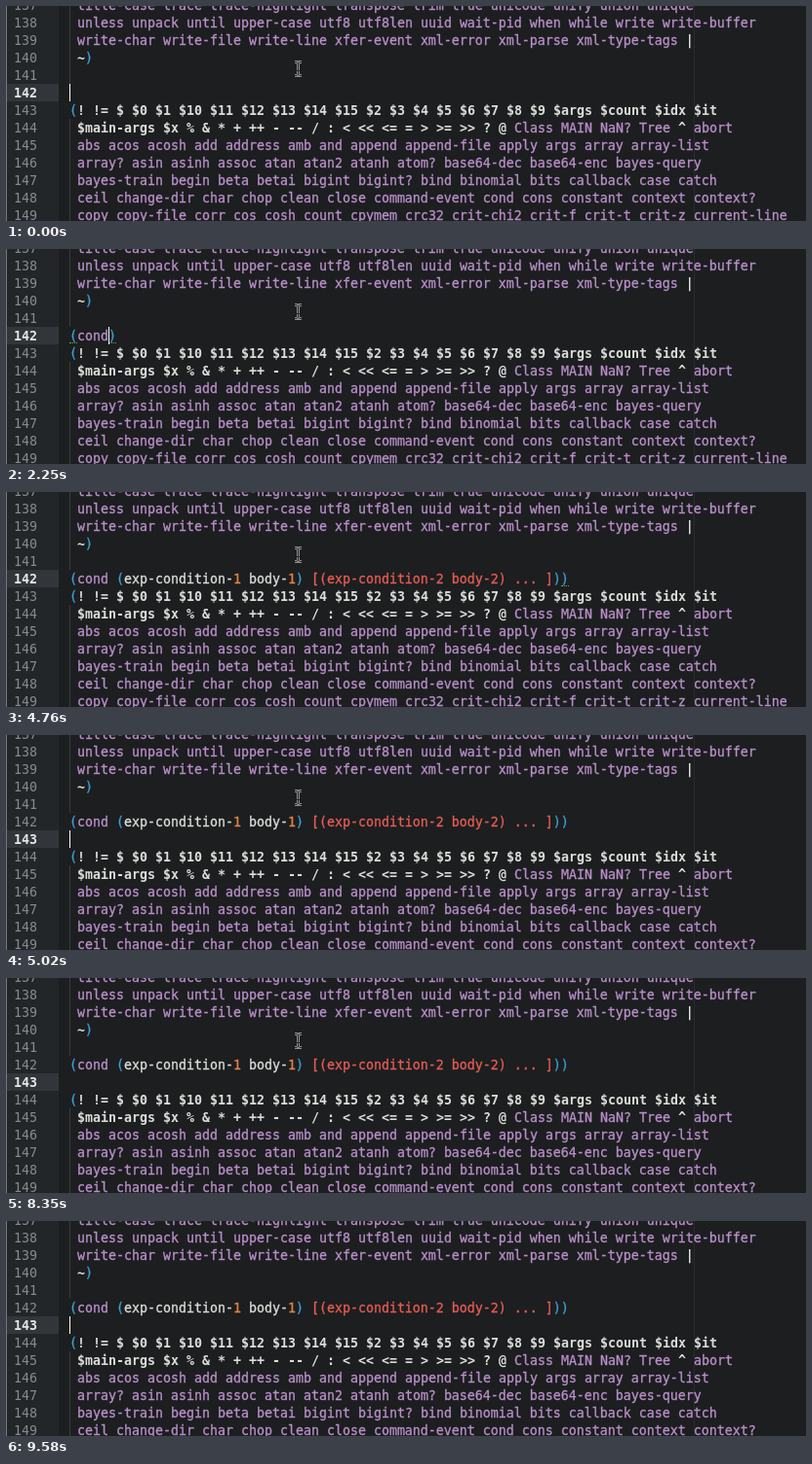
Write an HTML page that moves like this. It is 820x221 px and loops after 9790 ms.

```html
<!DOCTYPE html>
<html lang="en">
<head>
<meta charset="utf-8">
<title>Editor snippet</title>
<style>
  html, body { margin: 0; width: 100%; height: 100%; overflow: hidden; background: #1c1e20; }
  #stage {
    position: relative; width: 820px; height: 221px; overflow: hidden;
    background: #1c1e20; color: #dcddd8;
    font: 13.29px/20px "DejaVu Sans Mono", monospace;
    font-variant-ligatures: none;
    -webkit-text-stroke-width: .3px;
  }
  #stage > * { position: absolute; }
  .row { height: 18px; white-space: pre; }
  .block { left: 65px; }
  .guide { background: linear-gradient(#3a3d40, #3a3d40) 0 0 / 1px 18px no-repeat; }
  #margin { left: 0; top: 0; width: 53px; height: 221px; background: #232629; border-left: 1px solid #75787a; }
  #gutter { left: 8px; top: -10px; color: #878b8e; -webkit-text-stroke-width: 0; }
  #gutter .now { color: #e6e7e5; font-weight: bold; }
  #band { left: 1px; width: 53px; height: 18px; background: #32363b; }
  #ruler { left: 705px; top: 0; width: 1px; height: 221px; background: #292c2f; }
  #head { top: -10px; }
  #edit { top: 80px; }
  #caret { width: 1px; height: 18px; background: #fff; }
  .match { top: 96px; width: 8px; height: 0; border-top: 1px dotted #62ad6c; }
  #mouse { left: 0; top: 0; }
  .word { color: #ba8fc9; }
  .paren { color: #3d9fd0; }
  .sym { font-weight: bold; -webkit-text-stroke-width: 0; }
  .num { color: #e6823f; }
  .opt { color: #e65c52; }
</style>
</head>
<body>
<div id="stage">
  <div id="margin"></div>
  <div id="band"></div>
  <div id="ruler"></div>
  <div id="gutter"></div>
  <div id="head" class="block"></div>
  <div id="edit" class="block row"></div>
  <div id="tail" class="block"></div>
  <div class="match"></div>
  <div class="match"></div>
  <div id="caret"></div>
  <svg id="mouse" width="11" height="19" viewBox="0 0 11 19" fill="none">
    <g id="beam">
      <path id="bar" d="M2 2.5H4L5.5 4L7 2.5H9M5.5 4V15M2 16.5H4L5.5 15L7 16.5H9M4 11.5H7" stroke="#8d8f90" stroke-width="3"/>
      <use href="#bar" style="stroke: #222"/>
      <path d="M2 2.5H4L5.5 4L7 2.5H9M5.5 4V15M2 16.5H4L5.5 15L7 16.5H9M4 11.5H7" stroke="#26282a"/>
    </g>
  </svg>
</div>
<script>
const LOOP = 9790, ROW = 18, COL = 8, LEFT = 65;
const $ = id => document.getElementById(id);

const head = ` title-case trace trace-highlight transpose trim true unicode unify union unique
 unless unpack until upper-case utf8 utf8len uuid wait-pid when while write write-buffer
 write-char write-file write-line xfer-event xml-error xml-parse xml-type-tags |
 ~)
 `;
const tail = `(! != $ $0 $1 $10 $11 $12 $13 $14 $15 $2 $3 $4 $5 $6 $7 $8 $9 $args $count $idx $it
 $main-args $x % & * + ++ - -- / : < << <= = > >= >> ? @ Class MAIN NaN? Tree ^ abort
 abs acos acosh add address amb and append append-file apply args array array-list
 array? asin asinh assoc atan atan2 atanh atom? base64-dec base64-enc bayes-query
 bayes-train begin beta betai bigint bigint? bind binomial bits callback case catch
 ceil change-dir char chop clean close command-event cond cons constant context context?
 copy copy-file corr cos cosh count cpymem crc32 crit-chi2 crit-f crit-t crit-z current-line`;

function span(text, kind) {
  const el = document.createElement('span');
  el.textContent = text;
  if (kind) el.className = kind;
  return el;
}

function paint(text) {
  return text.match(/[()]|[^()\s]+|\s+/g)?.map(t =>
    span(t, /[()]/.test(t) ? 'paren' : /^[a-z]/i.test(t) ? 'word' : 'sym')) ?? [];
}

function fill(block, text) {
  for (const line of text.split('\n')) {
    const row = document.createElement('div');
    row.className = line.startsWith(' ') ? 'row guide' : 'row';
    row.append(...paint(line));
    block.append(row);
  }
}

const snippet = () => [
  ...paint('(cond ('), span('exp-condition-'), span('1', 'num'), span(' body-'), span('1', 'num'),
  ...paint(') '), span('[(exp-condition-2 body-2) ... ]', 'opt'), ...paint('))')
];

// Each step: start, text, caret column, columns of the underlined brackets
const steps = [
  [0, '', 0, []],
  [900, '()', 1, [0, 1]],
  [1890, '(c)', 2, [0, 2]],
  [1980, '(co)', 3, [0, 3]],
  [2070, '(con)', 4, [0, 4]],
  [2250, '(cond)', 5, [0, 5]],
  [3240, null, 63, [0, 63]],
  [3330, null, 63, [0, 62]],
  [4670, null, 64, [0, 62]],
  [4760, null, 64, [63]],
  [5020, null, 0, []]
];

// Times at which the caret turns off, on, off, ...
const blinks = [360, 810, 1170, 1620, 2430, 2790, 3150, 3240, 3600, 3950, 4400, 4670, 4760, 5020,
  5200, 5560, 6010, 6370, 6820, 7180, 7630, 7990, 8350, 8700, 9130, 9580];

// Pointer positions: time, x, y
const moves = [[0, 294, 55], [8790, 324, 62], [8880, 424, 88], [8970, 604, 134], [9050, 782, 181], [9130, 900, 221]];

const latest = (list, t) => list.findLast(item => item[0] <= t);

fill($('head'), head);
fill($('tail'), tail);
for (let n = 137; n < 150; n++) {
  const row = document.createElement('div');
  row.className = 'row';
  row.textContent = n;
  $('gutter').append(row);
}

const marks = document.querySelectorAll('.match');
let shown;

function show(step) {
  const [start, text, col, pair] = step;
  const line = start >= 5020 ? 1 : 0;
  const top = 80 + line * ROW + 'px';
  $('edit').replaceChildren(...(text === null ? snippet() : paint(text)));
  $('band').style.top = top;
  $('tail').style.top = 98 + line * ROW + 'px';
  [...$('gutter').children].forEach((row, i) => row.classList.toggle('now', i === 5 + line));
  marks.forEach((mark, i) => {
    mark.style.display = i < pair.length ? 'block' : 'none';
    mark.style.left = LEFT + COL * (pair[i] ?? 0) + 'px';
  });
  $('caret').style.left = LEFT + COL * col + 'px';
  $('caret').style.top = top;
  shown = step;
}

function draw(now) {
  const t = now % LOOP;
  const step = latest(steps, t);
  if (step !== shown) show(step);
  const flips = blinks.filter(b => b <= t).length;
  $('caret').style.visibility = flips % 2 ? 'hidden' : 'visible';
  const [, x, y] = latest(moves, t);
  $('mouse').style.transform = `translate(${x}px, ${y}px)`;
}

const begin = performance.now();
function tick() {
  draw(performance.now() - begin);
  requestAnimationFrame(tick);
}
tick();
</script>
</body>
</html>
```
